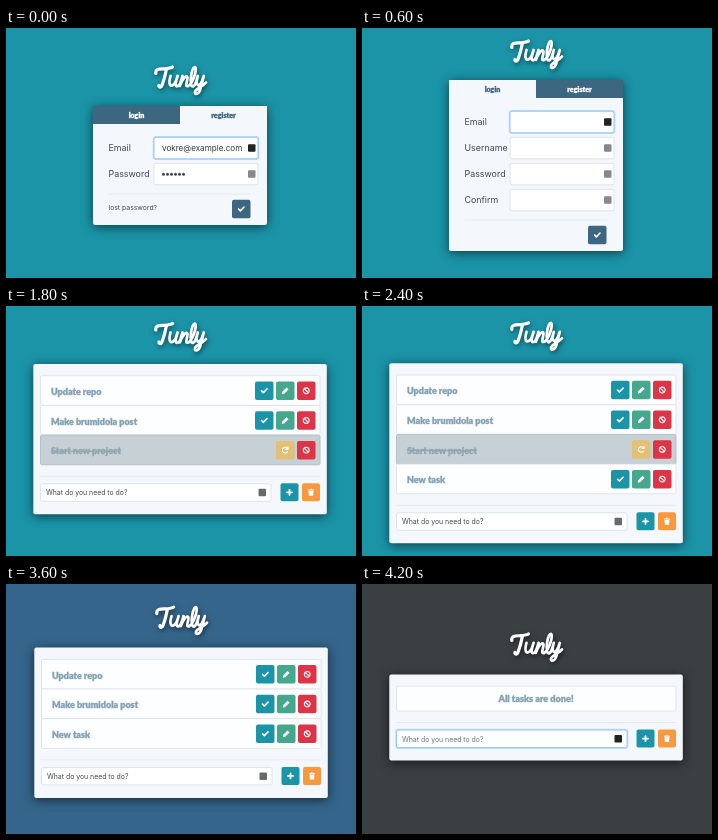
An HTML page that plays this animation: 350x250 px, repeating every 4800 ms.

```html
<!DOCTYPE html>
<html lang="en">
<head>
<meta charset="utf-8">
<title>Task list</title>
<style>
  html, body { margin: 0; width: 100%; height: 100%; overflow: hidden; }
  svg { display: block; width: 100vw; height: 100vh; }
  text { font-family: Inter, Roboto, sans-serif; }
  .medium { font-weight: 500; }
  .heavy { font-family: Lato, "Open Sans", sans-serif; font-weight: 900; stroke-width: .35; stroke-linejoin: round; }
  .line { fill: none; stroke-linecap: round; stroke-linejoin: round; }
  .panel { filter: drop-shadow(0 2px 5.5px rgba(0, 0, 0, .6)); }
  .title { filter: drop-shadow(1px 2px 2.5px rgba(0, 0, 0, .5)); }
</style>
</head>
<body>
<svg id="stage" viewBox="0 0 350 250"></svg>
<script>
const TEAL = '#1b94a8', SLATE = '#3d6681', BLUE = '#35658a', DARK = '#3a3f42';
const GREEN = '#45a78c', RED = '#dc3547', ORANGE = '#f8983f', GREY = '#6c757d';
const PAPER = '#f4f8fd', TASK = '#83a1b4', INK = '#43484d';
const ROW = 29.7;

const rect = (x, y, w, h, fill, extra = '') =>
  `<rect x="${x}" y="${y}" width="${w}" height="${h}" fill="${fill}" ${extra}/>`;
const text = (x, y, size, str, fill = INK, extra = '') =>
  `<text x="${x}" y="${y}" font-size="${size}" fill="${fill}" ${extra}>${str}</text>`;
const heavy = (x, y, size, str, fill, extra = 'text-anchor="middle"') =>
  text(x, y, size, str, fill, `class="heavy" stroke="${fill}" ${extra}`);
const line = (d, color = '#fff', width = 1.5) =>
  `<path class="line" d="${d}" stroke="${color}" stroke-width="${width}"/>`;
const group = (transform, body) => `<g transform="${transform}">${body}</g>`;
const rule = (x1, x2, y) => line(`M${x1} ${y}H${x2}`, '#e1e6eb', .8);

// Icons are centred on 0,0
const icons = {
  check: line('M-2.7 .1L-.9 1.9L2.8 -1.9', '#fff', 1.6),
  pencil: '<path d="M-3.5 3.5L-3 1.1L1.3 -3.3L3.3 -1.3L-1.1 3Z" fill="#fff"/>',
  ban: line('M-2.9 0a2.9 2.9 0 1 0 5.8 0a2.9 2.9 0 1 0 -5.8 0M-2 -2L2 2', '#fff', 1.1),
  redo: line('M2.3 1.6A2.8 2.8 0 1 1 2 -1.9M2.8 -3V-1H.8', '#fff', 1.1),
  plus: line('M-2.5 0H2.5M0 -2.5V2.5', '#fff', 1.8),
  trash: '<path d="M-3 -2.8H-1L-.6 -3.5H.6L1 -2.8H3V-1.8H-3ZM-2.5 -1.3H2.5L2.1 3.5H-2.1Z" fill="#fff"/>',
  exit: line('M-1.2 -2H-2.7V2H-1.2', '#fff', .9) +
    '<path d="M-1.3 -.8H.6V-2.3L3 0L.6 2.3V.8H-1.3Z" fill="#fff"/>'
};
const button = (x, y, size, fill, icon, opacity = 1) =>
  group(`translate(${x} ${y})`,
    rect(0, 0, size, size, fill, `rx="2" opacity="${opacity}"`) +
    group(`translate(${size / 2} ${size / 2})`, icons[icon]));

const field = (x, y, w, h, focused) =>
  (focused ? rect(x - 1.3, y - 1.3, w + 2.6, h + 2.6, '#bfdcff', 'rx="3"') : '') +
  rect(x, y, w, h, '#fff', `rx="2" stroke="${focused ? '#80bdff' : '#d8dde2'}" stroke-width=".8"`);

// Script heading, placed relative to the panel top
const title = top => `<g class="title" transform="translate(0 ${top - 58})">` +
  line('M149.8 24C149 19 154 19.5 158 19.3C162 19 165 18.8 166.5 17.5' +
    'M160.5 19.5C159 27 157.5 32 156 36C155 38.5 152.5 38 153 36', '#fff', 3.2) +
  line('M164.5 26.5C161.5 37 166 39 169.8 32L171.6 26.5L170 32C168.5 38 172 38.5 174.5 33' +
    'L176.5 26.5L173.8 36.5C176 30 180.5 24.5 181.5 28C182 31 177.8 38 182.5 36.5' +
    'C188 32 191.5 18 188.8 17.5C185.5 17.5 182.5 37 187 37C189 36.5 190 33 191.8 26.5' +
    'C189 36 192.5 39 196 31.5L197.8 26.5L194.3 40C192.3 46 187.5 45 189.3 41.5' +
    'C191 38.5 197 37 200 33', '#fff', 2.7) + '</g>';

const panel = (x, y, w, h) => rect(x, y, w, h, PAPER, 'rx="2" class="panel"');

function account(y, labels, registering) {
  const end = y + 36 + 26 * labels.length;
  const tab = (x, name, active) =>
    rect(x, y, 87, 18, active ? SLATE : PAPER) +
    heavy(x + 43.5, y + 11.5, 7.1, name, active ? '#fff' : SLATE);
  const rows = labels.map((label, i) => {
    const top = y + 31.3 + 26 * i;
    let body = text(102.5, top + 14, 8.9, label) + field(148, top, 104, 21.5, i === 0);
    if (!registering && label === 'Email') body += text(156, top + 14, 8.1, 'vokre@example.com', '#33383c');
    if (!registering && label === 'Password')
      for (let n = 0; n < 6; n++) body += `<circle cx="${157.5 + n * 4}" cy="${top + 11}" r="1.5" fill="${INK}"/>`;
    return body + rect(242, top + 7, 7.5, 7.5, i ? '#85898d' : '#222', 'rx="1"');
  }).join('');
  return title(y + 1.5) + panel(87, y, 174, end + 31 - y) +
    tab(87, 'login', !registering) + tab(174, 'register', registering) +
    rows + rule(103, 245, end) +
    (registering ? '' : text(102.5, end + 15.7, 6.85, 'lost password?')) +
    button(226, end + 5.7, 18.5, SLATE, 'check');
}

function taskRow(y, name, done) {
  return rect(34.5, y, 279.5, ROW, done ? '#c7d0d5' : '#fdfeff',
      `rx="1.5" stroke="${done ? '#b2bcc3' : '#dfe3e8'}" stroke-width=".9"`) +
    heavy(45, y + 19.2, 9, name, done ? '#91a6b2' : TASK,
      done ? 'text-decoration="line-through"' : '') +
    (done ? button(270, y + 5.8, 18.5, '#f1b743', 'redo', .65)
          : button(249, y + 5.8, 18.5, TEAL, 'check') + button(270, y + 5.8, 18.5, GREEN, 'pencil')) +
    button(291, y + 5.8, 18.5, RED, 'ban');
}

function list(y, tasks, doneIndex = -1) {
  const start = y + 11.7;
  const end = start + (tasks.length ? tasks.length * ROW : 25);
  const empty = !tasks.length;
  const rows = empty
    ? rect(34.5, start, 279.5, 25, '#fdfeff', 'rx="2" stroke="#dfe3e8" stroke-width=".9"') +
      heavy(174, start + 15.7, 9.1, 'All tasks are done!', TASK)
    : tasks.map((name, i) => taskRow(start + i * ROW, name, i === doneIndex)).join('');
  return title(y) + panel(27.3, y, 293.5, end + 49.5 - y) + rows + rule(34, 314, end + 11.5) +
    field(34.5, end + 19, 230.5, 17.5, empty) +
    text(40, end + 30.5, 6.9, 'What do you need to do?', empty ? GREY : INK) +
    rect(252.5, end + 24, 7.5, 7.5, empty ? '#222' : '#666a6d', 'rx="1"') +
    button(274.5, end + 18.5, 18, TEAL, 'plus') + button(296, end + 18.5, 18, ORANGE, 'trash');
}

function sidebar() {
  const swatches = [TEAL, '#9abf59', '#f36d6f', BLUE, DARK]
    .map((color, i) => rect(5 + 16 * i, 42, 10.5, 10.5, color, 'rx="2"')).join('');
  const input = (y, label) => text(4.7, y - 4.7, 5.4, label, INK, 'class="medium"') +
    field(4.7, y, 76, 13.3) + rect(72.5, y + 4, 6, 6, '#777b7f', 'rx="1"');
  const save = (y, label) => rect(4.5, y, 47.5, 13.7, TEAL, 'rx="2"') +
    text(28.2, y + 8.7, 5.3, label, '#fff', 'class="medium" text-anchor="middle"');
  return rect(0, 0, 88, 250, PAPER, 'class="panel"') + rect(86, 0, 2.2, 237, '#b9c0c5') +
    heavy(42.5, 14, 12, 'Hi vebo!', TEAL) + rule(5, 81, 24.5) +
    text(4.7, 37.3, 7.8, 'Background color') + swatches + rule(5, 81, 60.5) +
    text(4.7, 72.7, 7.4, 'Change password:') +
    input(88, 'Old password') + input(119, 'New password') + save(138.5, 'save password') +
    rule(5, 81, 160) + text(4.7, 172.7, 7.4, 'Change username') +
    input(188, 'new username') + save(208, 'save username') +
    button(69.3, 234.2, 14, GREY, 'exit');
}

const [repo, post, project, added] =
  ['Update repo', 'Make brumidola post', 'Start new project', 'New task'];
const back = color => rect(0, 0, 350, 250, color);
const scenes = [
  back(TEAL) + account(78, ['Email', 'Password'], false),
  back(TEAL) + account(52, ['Email', 'Username', 'Password', 'Confirm'], true),
  back(TEAL) + list(58, [repo, post, project]),
  back(TEAL) + list(58, [repo, post, project], 2),
  back(TEAL) + list(57.3, [repo, post, project, added], 2),
  back(TEAL) + group('translate(64.5 15.2) scale(.789)', list(57.3, [repo, post, project, added], 2)) +
    rect(0, 0, 350, 250, '#000', 'opacity=".5"') + sidebar(),
  back(BLUE) + group('translate(1 0)', list(63.6, [repo, post, added])),
  back(DARK) + list(90.4, [])
];

const stage = document.getElementById('stage');
let shown = -1;
function draw() {
  const index = Math.floor(performance.now() % 4800 / 600);
  if (index !== shown) stage.innerHTML = scenes[shown = index];
  requestAnimationFrame(draw);
}
draw();
</script>
</body>
</html>
```
